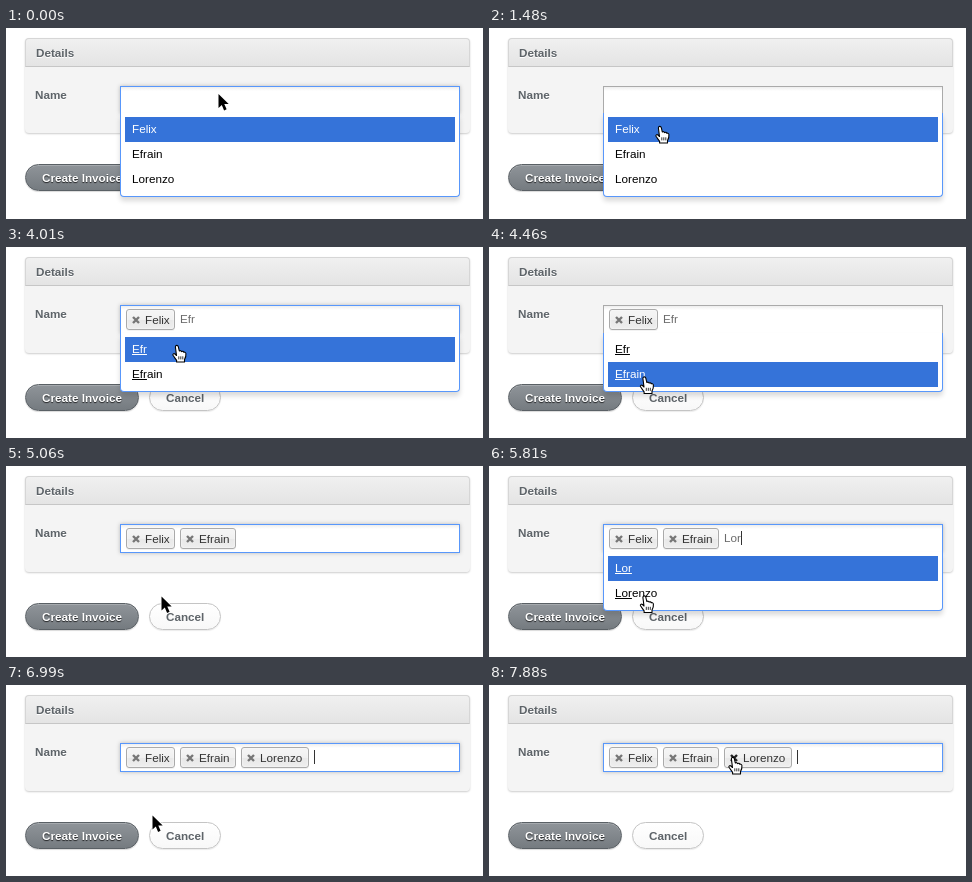
An HTML page for the animation above (8 s loop, 477 px wide and 191 px high).

```html
<!DOCTYPE html>
<html lang="en">
<head>
<meta charset="utf-8">
<title>Tag input</title>
<style>
html, body { margin: 0; width: 100%; height: 100%; overflow: hidden; background: #fff; }
#stage {
  --grow: 0px;
  position: relative; width: 477px; height: 191px; overflow: hidden;
  font: 11.7px "Liberation Sans", Arial, sans-serif; color: #000;
  white-space: nowrap; cursor: default;
}
#stage * { box-sizing: border-box; }
#stage > * { position: absolute; }

.panel {
  left: 19px; top: 10px; width: 445px; height: calc(95px + var(--grow));
  background: #f4f4f4; border-radius: 4px;
  box-shadow: 0 1px 2px rgba(0, 0, 0, .2);
}
.head {
  height: 29px; padding-left: 10px; line-height: 28px;
  border: 1px solid #d6d6d6; border-bottom-color: #c6c6c6; border-radius: 4px 4px 0 0;
  background: linear-gradient(#f0f0f0, #e4e4e4);
}
.head, .label { font-weight: bold; color: #5e6469; text-shadow: 0 1px 0 #fff; }
.label { left: 29px; top: 57px; line-height: 20px; }

.button {
  top: calc(136px + var(--grow)); height: 27px; padding-left: 16px;
  border: 1px solid; border-radius: 14px; font-weight: bold; line-height: 26px;
}
.dark {
  left: 19px; width: 114px; color: #fff; border-color: #5a6065;
  background: linear-gradient(#8f9499, #757b80);
  text-shadow: 0 1px 1px rgba(0, 0, 0, .75);
  box-shadow: 0 1px 1px rgba(0, 0, 0, .15), inset 0 1px 0 rgba(255, 255, 255, .2);
}
.light {
  left: 143px; width: 72px; color: #5e6469; border-color: #c4c4c4;
  background: linear-gradient(#fff, #f8f8f8);
  box-shadow: 0 1px 1px rgba(0, 0, 0, .08);
}

.field {
  left: 114px; top: 58px; width: 340px; height: calc(28px + var(--grow));
  border: 1px solid #aaa; background: linear-gradient(#eee, #fff 4px);
}
.focus .field { border-color: #5897fb; box-shadow: 0 0 4px rgba(0, 0, 0, .25); }
.list {
  display: none; left: 114px; top: calc(85px + var(--grow)); width: 340px;
  padding: 4px; border: 1px solid #5897fb; border-top: 0; border-radius: 0 0 4px 4px;
  background: #fff; box-shadow: 0 4px 5px rgba(0, 0, 0, .15);
}
.open .list { display: block; }
.row { height: 25px; padding-left: 7px; line-height: 24px; }
.row.hot { background: #3573d9; color: #fff; }

.entry { left: 120px; top: 62px; display: flex; align-items: flex-start; }
.chip {
  position: relative; flex: none; height: 21px; margin-right: 5px; padding-left: 18px;
  border: 1px solid #aaa; border-radius: 3px; line-height: 20px; color: #333;
  background: linear-gradient(#f4f4f4 20%, #f0f0f0 50%, #e8e8e8 52%, #eee);
  box-shadow: inset 0 0 2px #fff, 0 1px 0 rgba(0, 0, 0, .05);
}
.chip svg { position: absolute; left: 5px; top: 6px; stroke: #777; stroke-width: 2.4; }
.chip.over svg { stroke: #222; }
.typed { line-height: 20px; color: #6b6b6b; }
.caret { width: 1px; height: 14px; margin-top: 3px; background: #333; visibility: hidden; }
.blink .caret { visibility: visible; }

.pointer { left: 0; top: 0; overflow: visible; stroke-linejoin: round; }
.hand, .pointing .arrow { display: none; }
.pointing .hand { display: inline; }
</style>
</head>
<body>
<div id="stage">
  <div class="panel"><div class="head">Details</div></div>
  <div class="label">Name</div>
  <div class="button dark">Create Invoice</div>
  <div class="button light">Cancel</div>
  <div class="field"></div>
  <div class="list"></div>
  <div class="entry"></div>
  <svg class="pointer" width="1" height="1">
    <g class="arrow">
      <path d="M0 0V14L3.3 11L5.6 16.4L8.1 15.3L5.8 10.1H10.2Z" stroke="#fff" stroke-width="1.6" paint-order="stroke"/>
    </g>
    <g class="hand" fill="#fff" stroke="#000" stroke-width="1.1">
      <path d="M-1.6 1C-1.7 -.9 .8 -1.2 1.3 .6L2.3 5C3.1 4.3 4.4 4.7 4.6 5.6C5.4 5 6.6 5.4 6.8 6.3C7.8 5.9 8.8 6.5 8.9 7.5C9.2 10.3 8.6 11.8 7.5 13.6V16H-.4V14.4C-1.4 12.7 -2.9 11.1 -4 9.3C-4.6 8.1 -3.2 7 -2 8L-.5 9.5Z"/>
      <path d="M1.8 10.3V13.4M3.8 10.3V13.4M5.8 10.3V13.4" fill="none" stroke-width=".8"/>
    </g>
  </svg>
</div>
<script>
const LOOP = 8000;
const people = [
  { name: "Felix", width: 49 },
  { name: "Efrain", width: 56 },
  { name: "Lorenzo", width: 68 }
];

const start = {
  picked: 0, typed: "", open: true, focus: true, blink: false,
  hot: 0, hand: false, x: 212.5, y: 66, over: -1
};
const at = (x, y, more) => ({ x, y, ...more });
const type = typed => ({ typed, open: true, blink: true, hand: true });
const press = { focus: false, blink: false };
const pick = picked => ({
  picked, typed: "", open: false, focus: true, blink: true, hot: 0, hand: false
});

// Each step changes part of the state from its time on.
const steps = [
  [0, start],
  [290, { blink: true }],
  [740, { blink: false }],
  [1040, at(205, 72)],
  [1190, at(186, 87)],
  [1330, at(171, 99, { hand: true, blink: true })],
  [1480, press],
  [1620, pick(1)],
  [2070, { blink: false }],
  [2370, type("E")],
  [2970, { blink: false }],
  [3120, type("Ef")],
  [3410, type("Efr")],
  [4010, { blink: false }],
  [4160, at(166, 108)],
  [4310, at(157, 126, { hot: 1 })],
  [4460, at(155.5, 130.5, press)],
  [4610, pick(2)],
  [5060, { blink: false }],
  [5360, type("L")],
  [5660, type("Lo")],
  [5810, type("Lor")],
  [6400, at(145.5, 139, { hot: 1 })],
  [6550, at(145.5, 136, { blink: false })],
  [6700, at(146.5, 130.5)],
  [6840, press],
  [6990, pick(3)],
  [7290, at(156, 126)],
  [7440, at(186, 110, { blink: false })],
  [7580, at(222, 90)],
  [7730, at(240, 77)],
  [7880, at(244, 73, { hand: true, blink: true, over: 2 })]
];

const stage = document.getElementById("stage");
const find = name => stage.querySelector(name);
const list = find(".list"), entry = find(".entry"), pointer = find(".pointer");

function underline(text, part) {
  const i = part ? text.toLowerCase().indexOf(part.toLowerCase()) : -1;
  if (i < 0) return text;
  const end = i + part.length;
  return `${text.slice(0, i)}<u>${text.slice(i, end)}</u>${text.slice(end)}`;
}

function options({ picked, typed }) {
  const left = people.slice(picked).map(p => p.name)
    .filter(name => name.toLowerCase().includes(typed.toLowerCase()));
  return typed ? [typed, ...left] : left;
}

const chip = (p, over) =>
  `<div class="chip${over ? " over" : ""}" style="width:${p.width}px">` +
  `<svg width="8" height="8"><path d="M1 1L7 7M7 1L1 7"/></svg>${p.name}</div>`;

function draw(s) {
  for (const name of ["open", "focus", "blink"]) stage.classList.toggle(name, s[name]);
  stage.style.setProperty("--grow", s.picked ? "1px" : "0px");
  list.innerHTML = options(s).map((text, i) =>
    `<div class="row${i === s.hot ? " hot" : ""}">${underline(text, s.typed)}</div>`).join("");
  entry.innerHTML = people.slice(0, s.picked).map((p, i) => chip(p, i === s.over)).join("") +
    `<span class="typed">${s.typed}</span><span class="caret"></span>`;
  pointer.classList.toggle("pointing", s.hand);
  pointer.style.transform = `translate(${s.x}px, ${s.y}px)`;
}

const origin = performance.now();
let shown = 0;

function tick() {
  const t = (performance.now() - origin) % LOOP;
  const past = steps.filter(([time]) => time <= t);
  if (past.length !== shown) {
    shown = past.length;
    draw(Object.assign({}, ...past.map(([, change]) => change)));
  }
  requestAnimationFrame(tick);
}
tick();
</script>
</body>
</html>
```
